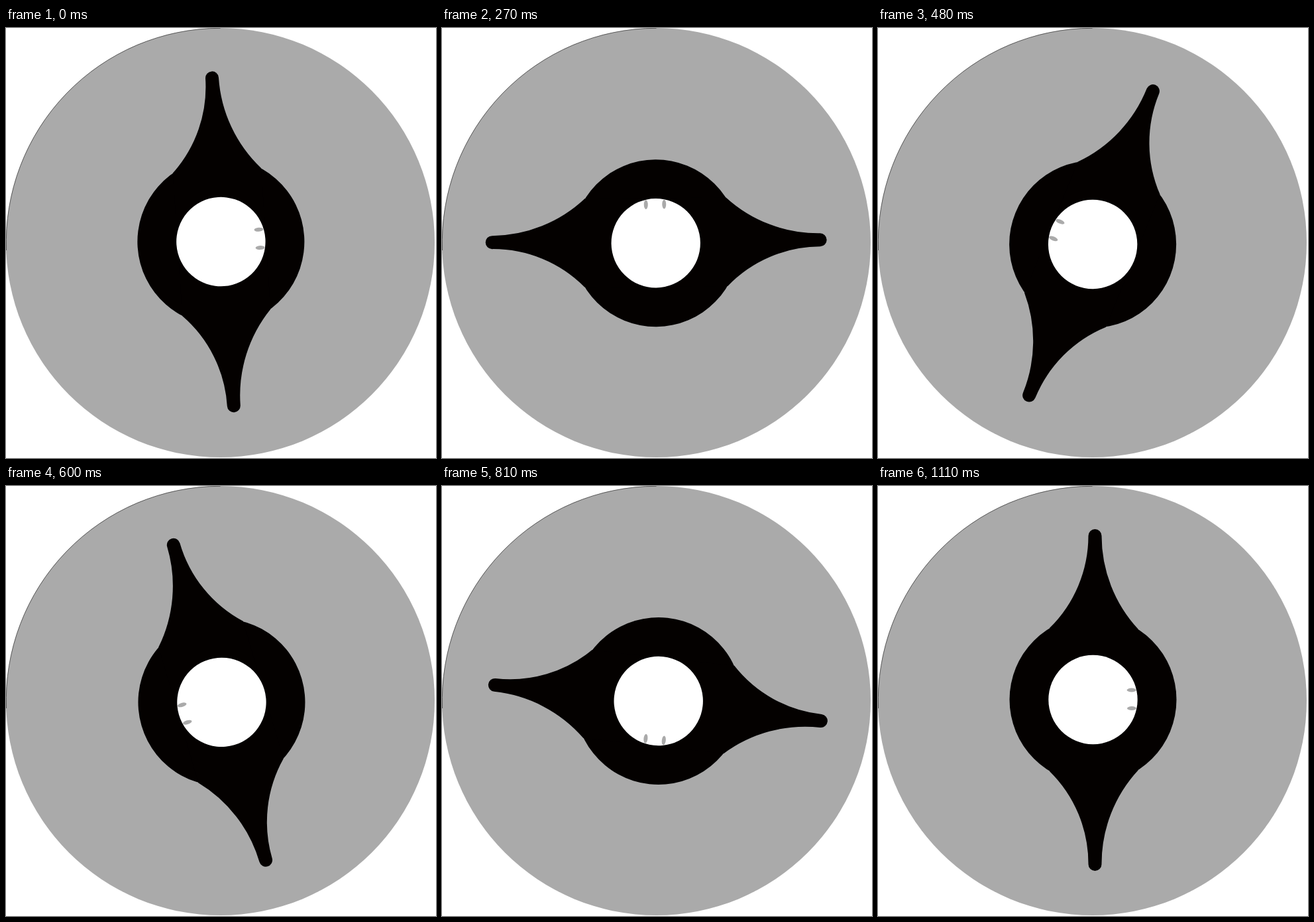
An HTML page that plays this animation: 649x648 px, repeating every 1.14 s.

```html
<!DOCTYPE html>
<html lang="en">
<head>
<meta charset="utf-8">
<title>Spinning disc</title>
<style>
  html, body { margin: 0; width: 100%; height: 100%; overflow: hidden; background: #fff; }
  svg { display: block; }
</style>
</head>
<body>
<svg width="649" height="648" viewBox="0 0 649 648">
  <circle cx="323.5" cy="323.5" r="323.5" fill="#aaa"/>
  <path d="M323.5 .3A323.2 323.2 0 0 0 .5 335" fill="none" stroke="#444" stroke-width=".8"/>
  <g id="rotor">
    <g fill="#040100">
      <circle cx="324.5" cy="322" r="126"/>
      <path d="M259 214A195 195 0 0 0 317.5 75A10 10 0 0 1 337.5 75A207 207 0 0 0 392.5 215.5
               V428.5A207 207 0 0 0 337.5 570A10 10 0 0 1 317.5 570A195 195 0 0 0 259 430Z"/>
    </g>
    <circle cx="324.5" cy="322" r="67.2" fill="#fff"/>
    <g fill="#aaa">
      <ellipse cx="382.7" cy="307.5" rx="7" ry="3"/>
      <ellipse cx="383" cy="335" rx="7" ry="3"/>
    </g>
  </g>
</svg>
<script>
  const LOOP = 1140, STEP = 30;
  const START = 3.8, TURN = (360 - START) / 37; // degrees, counter-clockwise
  const rotor = document.getElementById('rotor');
  let begin;

  function draw(now) {
    begin ??= now;
    const step = Math.floor((now - begin) % LOOP / STEP);
    rotor.setAttribute('transform', `rotate(${-START - step * TURN} 324.7 324)`);
    requestAnimationFrame(draw);
  }
  requestAnimationFrame(draw);
</script>
</body>
</html>
```
